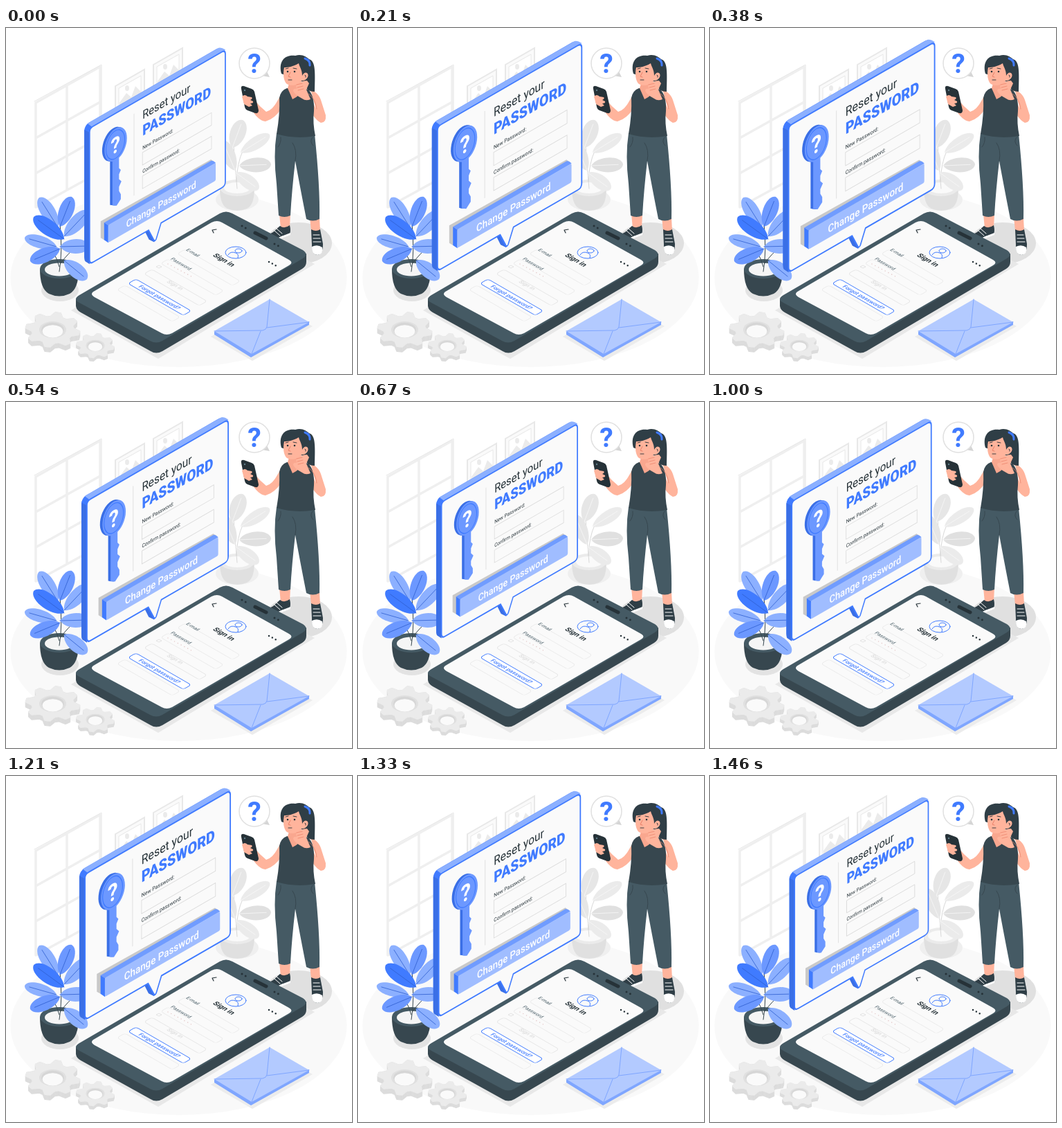
Recreate the animation shown at these times as an HTML page. Size 500 px wide and 500 px high, loop 1.5 s.

```html
<!DOCTYPE html>
<html lang="en">
<head>
<meta charset="utf-8">
<title>Reset your password</title>
<style>
  html, body { margin: 0; height: 100%; overflow: hidden; background: #fff; }
  svg { display: block; width: 100vw; height: 100vh; }
  text { font-family: Roboto, Arial, sans-serif; }
  .line { fill: none; stroke-linecap: round; stroke-linejoin: round; }
  .b { font-weight: 700; }
  .skin { fill: #ffb49c; }
</style>
</head>
<body>
<svg viewBox="0 0 500 500">
  <ellipse cx="249.500" cy="361" rx="243" ry="129" fill="#f9f9f9"/>

  <g id="window" class="line" stroke="#efefef" stroke-width="3.500">
    <path d="M43 108L136 56V208L43 259ZM88 83V233M43 159L136 107M43 210L136 158"/>
    <path d="M41 106L138 53V207" stroke="#e6e6e6" stroke-width="1"/>
  </g>
  <g id="pictures" stroke="#e8e8e8" stroke-width="2">
    <g id="picture">
      <path d="M158 84L200 60V112L158 136Z" fill="#fafafa"/>
      <path d="M163 87L195 69V106L163 124Z" fill="#fff" stroke-width="1"/>
      <path d="M164 108L174 94L181 100L187 84L195 92V106L164 123Z" fill="#ebebeb" stroke="none"/>
      <ellipse cx="175" cy="87" rx="3" ry="4" fill="#ebebeb" stroke="none"/>
    </g>
    <use href="#picture" x="55" y="-31"/>
  </g>

  <g id="greyPlant">
    <ellipse cx="334" cy="248" rx="31" ry="16" fill="#efefef"/>
    <path d="M309 231Q309 256 320 261Q334 267 348 261Q359 256 359 231Z" fill="#e0e0e0"/>
    <ellipse cx="334" cy="231" rx="25" ry="12" fill="#ebebeb"/>
    <ellipse cx="334" cy="231" rx="19" ry="8" fill="#fafafa"/>
    <path d="M334 232Q331 200 329 170M333 222Q334 195 342 178" class="line" stroke="#d8d8d8"/>
    <g id="greyLeaves"></g>
  </g>

  <g id="woman">
    <ellipse cx="423" cy="311" rx="48" ry="30" fill="#e0e0e0"/>
    <path d="M395 268H411L410 289L397 290ZM439 274H453L454 293L441 293Z" class="skin"/>
    <path d="M410 285Q412 293 410 298L398 301Q390 307 381 303Q377 299 386 295L396 286Q402 291 410 285Z" fill="#2f3e46"/>
    <path d="M380 302Q390 306 398 301L411 296V299L398 304Q388 309 380 304Z" fill="#fff"/>
    <path d="M441 291Q448 295 454 291L458 312Q458 327 450 328Q441 327 442 313Z" fill="#2f3e46"/>
    <path d="M442 316Q450 312 457 317Q459 327 450 328Q441 327 442 316Z" fill="#fff"/>
    <path d="M391 290L399 297M388 293L396 300M444 299H453M444 304H454M444 309H455" class="line" stroke="#fff" stroke-width="1"/>
    <path d="M391 152Q386 184 391 225L394 271Q402 275 411 271Q413 235 418 192Q424 225 434 276Q443 281 453 276Q454 230 446 153Z" fill="#455a64"/>
    <path d="M418 192Q421 176 414 166M397 158Q398 166 393 172M443 158Q438 164 444 170" class="line" stroke="#37474f" stroke-width="1"/>

    <path d="M405 92Q397 95 393 104Q385 119 376 121Q366 113 359 104L353 115Q364 134 375 135Q389 131 398 116Z" class="skin"/>
    <path d="M434 88Q450 90 455 104L462 126Q463 137 455 137Q443 131 430 101L437 94L448 117L441 92Z" class="skin"/>
    <path d="M406 87Q397 90 395 101Q396 125 391 153Q417 161 447 156Q443 137 445 120Q446 98 437 89L429 87Z" fill="#37474f"/>
    <path d="M410 77L407 87Q411 96 414 103Q426 97 430 88L426 75Z" fill="#f9a78f"/>
    <path d="M398 66C393 47 404 38 418 40C428 37 434 42 438 45C447 48 447 61 446 92C436 92 432 86 430 78Z" fill="#2f3e46"/>
    <path d="M432 44Q440 47 439 54" class="line" stroke="#407bff" stroke-width="3"/>
    <path d="M402 57C400 66 401 77 406 81C414 85 423 82 427 76C435 77 439 68 435 65Q431 63 428 69C428 60 424 56 423 51C415 56 407 57 402 57Z" class="skin"/>
    <circle cx="407" cy="63" r="1.300" fill="#263238"/><circle cx="417" cy="63" r="1.300" fill="#263238"/>
    <path d="M404 59L408 58M415 58L420 59M408 75H413M432 68Q434 68 433 71" class="line" stroke="#263238" stroke-width=".9"/>
    <path d="M411 64L408 70L411 71" class="line" stroke="#e98068"/>
    <path d="M419 83Q426 76 435 76L438 80L434 89L440 103Q433 106 428 102Q418 97 415 91Q415 87 420 88Z" class="skin"/>
    <path d="M420 82L428 80M421 86L429 84M422 90L430 88" class="line" stroke="#e98068" stroke-width=".7"/>
    <path d="M437 95Q447 101 449 117" class="line" stroke="#e98068" stroke-width=".7"/>
    <path d="M340 88Q339 83 344 84L355 88Q358 89 359 92L365 119Q365 124 360 123L349 119Q346 118 345 114Z" fill="#263238"/>
    <circle cx="345" cy="90" r="1.200" fill="#607d8b"/>
    <path d="M341 99Q345 95 349 99L355 100Q357 102 353 104L357 106Q358 109 353 109L356 112L351 114L344 110Z" class="skin"/>
  </g>

  <g id="thought">
    <path d="M370 69L381 71L376 61Z" fill="#d5d5d5"/>
    <circle cx="359" cy="51" r="22" fill="#fff" stroke="#e0e0e0" stroke-width="1.500"/>
    <text x="359" y="65" font-size="39" class="b" fill="#407bff" text-anchor="middle">?</text>
  </g>

  <g id="bluePlant">
    <ellipse cx="78" cy="379" rx="27" ry="16" fill="#e3e3e3"/>
    <path d="M49 348Q49 377 62 384Q77 391 92 384Q105 377 105 348Z" fill="#37474f"/>
    <ellipse cx="77" cy="348" rx="28" ry="14" fill="#455a64"/>
    <ellipse cx="77" cy="349" rx="21" ry="9.500" fill="#f5f5f5"/>
    <path d="M77 352Q82 325 78 282M77 345Q70 320 60 318M79 340Q90 325 100 318" class="line" stroke="#37474f"/>
    <g id="blueLeaves"></g>
  </g>

  <g id="phone">
    <path d="M94 408L318 277L446 341L220 478Z" fill="#e8e8e8"/>
    <path d="M101 392V402Q102 408 108 411L209 467Q217 472 226 467L428 348Q434 344 434 338V326Z" fill="#37474f"/>
    <path d="M106 386L309 268Q318 263 327 268L429 321Q438 327 429 333L226 452Q217 457 208 452L106 397Q96 392 106 386Z" fill="#455a64"/>
    <path d="M128 380L297 281Q305 277 312 281L409 335Q416 339 409 343L240 441Q232 445 225 441L128 389Q120 384 128 380Z" fill="#fafafa"/>
    <path d="M360 296L376 304" class="line" stroke="#263238" stroke-width="5"/>
    <path d="M341 286L348 290M388 312L394 315" class="line" stroke="#263238" stroke-width="3" stroke-dasharray="0 6"/>
    <path d="M304 291L298 292L300 296" class="line" stroke="#263238" stroke-width="1.200"/>
    <path d="M380 338L394 345.500" class="line" stroke="#263238" stroke-width="2.500" stroke-dasharray="0 5.500"/>
    <g class="line" stroke="#407bff">
      <ellipse cx="332" cy="324.500" rx="15" ry="8.500"/>
      <ellipse cx="336" cy="322" rx="5" ry="3"/>
      <path d="M321 328Q324 322 332 325Q337 327 335 332"/>
    </g>
    <g id="form"></g>
  </g>

  <g id="envelope">
    <path d="M296 446L380 397L443 431L356 481Z" fill="#ececec"/>
    <path d="M301 439V443L354 476L438 429V424Z" fill="#7fa6ff"/>
    <path d="M301 438L381 392L438 425L355 471Z" fill="#b3caff"/>
    <path d="M301 438L371 437Q376 436 377 432L381 392M377 433L438 425M355 471L368 438" class="line" stroke="#7fa6ff"/>
  </g>

  <g id="gears"></g>

  <g id="panel">
    <g transform="matrix(.866 -.5 0 1 114 141)">
      <rect width="226" height="196" rx="7" fill="#407bff" stroke="#407bff" stroke-width="1.500"/>
    </g>
    <path d="M118 138L307 29Q311 28 317 32L126 144Z" fill="#8cb0ff"/>
    <path d="M113.500 147L121 151V341L115 337Q113.500 336 113.500 332Z" fill="#3a6fe6"/>
    <path d="M201 293L207 305L214 308.500L212 290Z" fill="#3a6fe6" stroke="#3a6fe6" stroke-linejoin="round"/>
    <g transform="matrix(.866 -.5 0 1 121 145)">
      <path d="M6 0H220Q226 0 226 6V190Q226 196 220 196H119L111 215Q109 218 107 215L98 196H6Q0 196 0 190V6Q0 0 6 0Z" fill="#fafafa" stroke="#407bff" stroke-width="2"/>
      <path d="M74 16V134" stroke="#dedede"/>
      <text x="88" y="31" font-size="17" fill="#263238">Reset your</text>
      <text x="88" y="55" font-size="21.300" font-weight="900" fill="#407bff">PASSWORD</text>
      <g font-size="7.400" fill="#263238">
        <text x="88" y="75">New Password:</text>
        <text x="88" y="109">Confirm password:</text>
      </g>
      <path d="M88 79H203V97H88ZM88 113H203V131H88Z" fill="none" stroke="#dadada" stroke-width=".9"/>
      <g transform="translate(-4 -2.500)" fill="#3a6fe6"><use href="#key"/></g>
      <g transform="translate(-2 -1.200)" fill="#3a6fe6"><use href="#key"/></g>
      <g fill="#6c98ff"><use href="#key"/></g>
      <ellipse cx="43" cy="45" rx="15.500" ry="20" fill="none" stroke="#407bff" stroke-width="1.200"/>
      <text x="43" y="57" font-size="32" class="b" fill="#fff" text-anchor="middle">?</text>
    </g>
    <path d="M137 279L296 190L300 193L142 306L137 303Z" fill="#c9c9c9"/>
    <path d="M142 281L296 192Q299 191 303 195L148 285Z" fill="#709cff"/>
    <path d="M142 281L148 285V310L142 306Z" fill="#407bff"/>
    <g transform="matrix(.866 -.5 0 1 121 145)">
      <rect x="31" y="155" width="179" height="25.500" rx="2" fill="#a0bdff"/>
      <text x="61" y="174" font-size="14.400" font-weight="500" fill="#fff">Change Password</text>
    </g>
  </g>
  <defs>
    <path id="key" d="M43 22A18.500 23 0 0 1 49 67V82L52 86L49 91V98L53 103L49 109V115L52 121V128L45 134L38 130V67A18.500 23 0 0 1 43 22Z"/>
  </defs>
</svg>
<script>
const $ = id => document.getElementById(id);
const add = (id, markup) => $(id).insertAdjacentHTML('beforeend', markup);

// A leaf from base to tip with a mid vein
function leaf(id, [x, y, tx, ty, w, fill], vein) {
  const dx = tx - x, dy = ty - y, len = Math.hypot(dx, dy);
  const nx = -dy / len * w, ny = dx / len * w;
  const at = (f, side) => `${x + dx * f + nx * side} ${y + dy * f + ny * side}`;
  add(id, `<path d="M${x} ${y}C${at(.2, 1)} ${at(.95, 1)} ${tx} ${ty}C${at(.95, -1)} ${at(.2, -1)} ${x} ${y}" fill="${fill}"/>
    <path d="M${x} ${y}L${at(.85, 0)}" class="line" stroke="${vein}" stroke-width=".8"/>`);
}
const light = '#8cb0ff', mid = '#6c98ff', blue = '#407bff';
[
  [75, 288, 48, 245, 14, light], [78, 287, 95, 244, 14, mid],
  [84, 301, 119, 264, 14, light], [84, 305, 40, 273, 15, blue],
  [73, 316, 27, 303, 12, light], [78, 316, 120, 315, 14, light],
  [78, 319, 35, 337, 14, mid], [84, 336, 117, 363, 14, light]
].forEach(l => leaf('blueLeaves', l, '#2f5fd0'));
[
  [327, 173, 342, 133, 15, '#e6e6e6'], [339, 180, 381, 154, 12, '#ebebeb'],
  [331, 206, 313, 163, 13, '#e6e6e6'], [337, 199, 383, 197, 14, '#e0e0e0'],
  [332, 209, 365, 233, 13, '#ebebeb']
].forEach(l => leaf('greyLeaves', l, '#f8f8f8'));

// Shapes lying on the floor plane
const floor = (x, y, inner) => `<g transform="matrix(.866 .5 -.866 .5 ${x} ${y})">${inner}</g>`;
const pill = (x, y, stroke, fill = 'none') =>
  add('form', floor(x, y, `<rect x="-46" y="-6.500" width="92" height="13" rx="4" fill="${fill}" stroke="${stroke}"/>`));
const label = (x, y, size, fill, str, weight = 400) =>
  add('form', floor(x, y, `<text font-size="${size}" font-weight="${weight}" fill="${fill}" text-anchor="middle">${str}</text>`));
pill(293, 346, '#ebebeb');
pill(269, 360, '#ebebeb');
pill(245, 375, '#e6e6e6');
pill(222, 389, blue, '#fff');
pill(206, 398, '#ebebeb');
label(312, 337, 10.500, '#263238', 'Sign in', 700);
label(268, 326, 7.200, '#455a64', 'E-mail');
label(251, 342, 7.200, '#455a64', 'Password');
label(242, 373, 8, '#dcdcdc', 'Sign in', 500);
label(219.500, 390.500, 8.300, blue, 'Forgot password?', 500);
add('form', `<path d="M234 341L268 359" class="line" stroke="#e6cccc" stroke-width="1.600" stroke-dasharray="0 5.400"/>
  <path d="M217 345L221 343L225 345L221 347Z" fill="none" stroke="#ddd" stroke-width=".8"/>`);

function gear(cx, cy, r, teeth) {
  const ring = (rad, y) => Array.from({ length: teeth * 4 }, (_, i) => {
    const a = (i + .5) / (teeth * 4) * 2 * Math.PI, k = i % 4 < 2 ? rad : rad * .77;
    return `${cx + k * Math.cos(a)} ${y + k * .64 * Math.sin(a)}`;
  }).join('L');
  const body = (y, fill) => `<path d="M${ring(r, y)}Z" fill="${fill}" stroke="${fill}" stroke-width="2" stroke-linejoin="round"/>`;
  const hole = (k, y, fill) => `<ellipse cx="${cx}" cy="${y}" rx="${r * k}" ry="${r * k * .62}" fill="${fill}"/>`;
  const depth = r * .18;
  for (let d = depth; d > 0; d--) add('gears', body(cy + d, '#dcdcdc'));
  add('gears', body(cy, '#ebebeb') + hole(.5, cy, '#e0e0e0') + hole(.42, cy, '#d6d6d6') + hole(.38, cy + depth / 3, '#fafafa'));
}
gear(67.500, 436, 39, 8);
gear(129, 459, 27, 8);

// Panel pulse: two uneven swells per loop
const LOOP = 1500;
const linear = u => u, outSine = u => Math.sin(u * Math.PI / 2), inOut = u => (1 - Math.cos(u * Math.PI)) / 2;
const swells = [
  [-40, 350, 0, 1, outSine], [350, 795, 1, 0, inOut],
  [795, 1240, 0, 1, linear], [1240, 1460, 1, 0, inOut]
];
function frame(now) {
  let t = now % LOOP;
  if (t >= 1460) t -= LOOP;
  const [start, end, from, to, ease] = swells.find(s => t < s[1]);
  const swell = from + (to - from) * ease((t - start) / (end - start));
  const scale = (1 + .093 * swell) / 1.013;
  $('panel').setAttribute('transform', `translate(215.500 184.500) scale(${scale}) translate(-215.500 -184.500)`);
  requestAnimationFrame(frame);
}
frame(performance.now());
</script>
</body>
</html>
```
